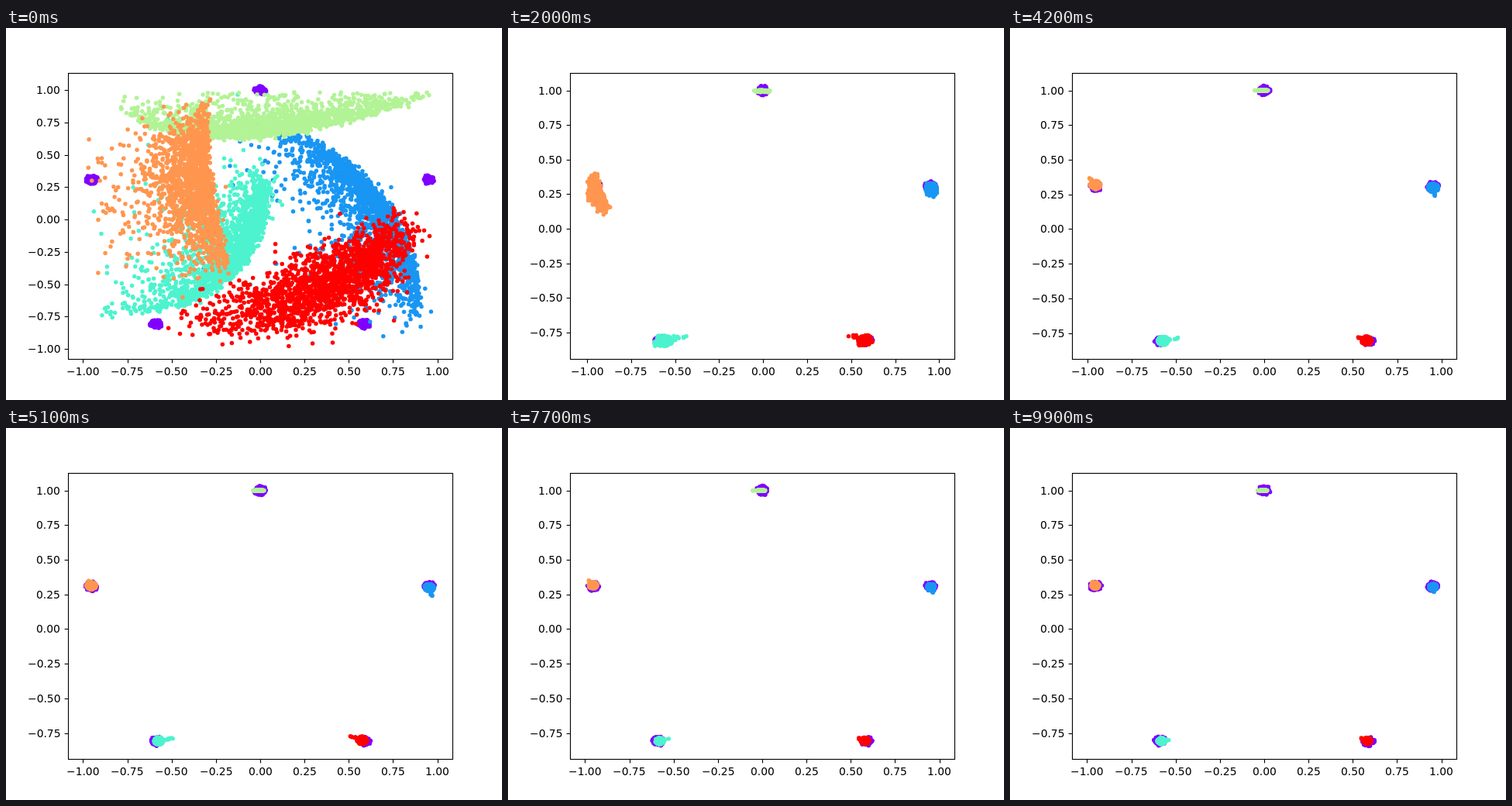
An HTML page with a canvas for the animation above (10 s loop, 640 px wide and 480 px high).

```html
<!DOCTYPE html>
<html lang="en">
<head>
<meta charset="utf-8">
<title>Scatter clusters</title>
<style>
html, body { margin: 0; width: 100%; height: 100%; overflow: hidden; background: #fff; }
canvas { display: block; }
</style>
</head>
<body>
<canvas id="plot" width="640" height="480"></canvas>
<script>
const ctx = document.getElementById('plot').getContext('2d');
const STEPS = 100, STEP_MS = 100, DOT = 2.75;
const SHAPED = 9, SETTLED = 32;            // steps at which the clouds reach each phase
const RADIUS = .035;                       // of a mode, in data units
const box = { left: 80, top: 57.6, right: 576, bottom: 427.2 };

const modes = [0, 1, 2, 3, 4].map(i => {
  const a = Math.PI * (.5 + .4 * i);
  return [Math.cos(a), Math.sin(a)];
});

// wide, tight: three control points of the dense edge, then the mean spread away from it
// fuzz: blur in both phases; tail: reach of the stray dots once settled
const clouds = [
  { color: '#1996f3', mode: modes[4], tail: [.02, -.09],
    wide: [[-.08, .8], [.845, .485], [.91, -.77], [-.07, -.1]],
    tight: [[.952, .4], [.985, .33], [.982, .02], [-.012, .01]] },
  { color: '#4df3ce', mode: modes[2], tail: [.13, .03],
    wide: [[-.93, -.76], [.07, -.735], [.025, .37], [-.06, .12]],
    tight: [[-.877, -.98], [-.44, -.97], [-.371, -.813], [-.025, .045]] },
  { color: '#b2f396', mode: modes[0], tail: [-.08, 0], flat: .1,
    wide: [[-.82, .88], [-.32, .355], [.985, .97], [0, .09]],
    tight: [[-.15, .995], [0, .985], [.14, .995], [0, -.012]] },
  { color: '#ff964f', mode: modes[1], tail: [-.04, .07],
    wide: [[-.275, .96], [-.375, .55], [-.16, -.47], [-.13, -.05]],
    tight: [[-.996, .913], [-.985, .04], [-.473, -.958], [-.07, -.1]] },
  { color: '#ff0000', mode: modes[3], tail: [-.1, .05], fuzz: [.13, .03],
    wide: [[-.54, -.82], [.48, -.69], [.82, -.02], [0, 0]],
    tight: [[.455, -.97], [.57, -.875], [.75, -.8], [0, 0]] }
];

const lerp = (a, b, t) => a + (b - a) * t;
const mix = (a, b, t) => a.map((v, i) => lerp(v, b[i], t));
const easeOut = (t, power) => 1 - Math.pow(1 - t, power);

function seeded(seed) {
  let s = seed * 7919 + 12345;
  return () => {
    s = (s + 0x6D2B79F5) | 0;
    let t = Math.imul(s ^ (s >>> 15), 1 | s);
    t = (t + Math.imul(t ^ (t >>> 7), 61 | t)) ^ t;
    return ((t ^ (t >>> 14)) >>> 0) / 4294967296;
  };
}

// A dot beside a quadratic curve, thinning out with depth
function beside([a, b, c, spread], fuzz, { u, depth, noise }) {
  const taper = .15 + .85 * Math.sqrt(Math.sin(Math.PI * u));
  const curve = mix(mix(a, b, u), mix(b, c, u), u);
  const blur = fuzz + .35 * depth * Math.hypot(...spread);
  return curve.map((v, i) => v + taper * (spread[i] * depth + blur * noise[i]));
}

function settled(cloud, step, reach, { angle, r, stray }) {
  const age = Math.max(0, step - SETTLED);
  const size = RADIUS * (.65 + .35 * Math.exp(-age / 25)) * (stray ? .15 : r);
  const pull = reach * (.5 + .5 * Math.exp(-age / 20)) * (stray || .15);
  return [cloud.mode[0] + cloud.tail[0] * pull + size * Math.cos(angle),
          cloud.mode[1] + cloud.tail[1] * pull + size * Math.sin(angle) * (cloud.flat || 1)];
}

function makeDots(step) {
  const rnd = seeded(step + 1);
  const gauss = () => Math.sqrt(-2 * Math.log(1 - rnd())) * Math.cos(2 * Math.PI * rnd());
  const dots = [];

  for (const [x, y] of modes)
    for (let i = 0; i < 400; i++) {
      const r = Math.min(RADIUS, .0112 * Math.sqrt(-2 * Math.log(1 - rnd())));
      const a = rnd() * 2 * Math.PI;
      dots.push([x + r * Math.cos(a), y + r * Math.sin(a), '#8000ff']);
    }

  const shaping = easeOut(Math.min(1, step / SHAPED), 1.5);
  const settling = easeOut(Math.min(1, Math.max(0, step - SHAPED) / (SETTLED - SHAPED)), 3);
  const count = lerp(1800, 170, settling);
  for (const cloud of clouds) {
    const [wideFuzz, tightFuzz] = cloud.fuzz || [.012, .003];
    const reach = .7 + .5 * rnd();
    for (let i = 0; i < count; i++) {
      const draw = {
        u: Math.pow((rnd() + rnd()) / 2, .8), depth: -Math.log(1 - rnd()),
        noise: [gauss(), gauss()], angle: rnd() * 2 * Math.PI, r: Math.pow(rnd(), .6),
        stray: i % 20 ? 0 : i ? rnd() : 1
      };
      const shaped = mix(beside(cloud.wide, wideFuzz, draw),
                         beside(cloud.tight, tightFuzz, draw), shaping);
      const [x, y] = mix(shaped, settled(cloud, step, reach, draw), settling);
      const limit = lerp(.985, 1, shaping);
      if (Math.abs(x) < limit && Math.abs(y) < limit + .01 * settling)
        dots.push([x, y, cloud.color]);
    }
  }
  return dots;
}

// Linear scale over the data with a 5% margin on both sides
function fit(values, low, high, from, to) {
  for (const v of values) {
    low = Math.min(low, v);
    high = Math.max(high, v);
  }
  const margin = .05 * (high - low);
  return v => lerp(from, to, (v - low + margin) / (high - low + 2 * margin));
}

function drawAxes(toX, toY) {
  const snap = v => Math.floor(v + .5) + .5;
  const line = (x0, y0, x1, y1) => {
    ctx.beginPath();
    ctx.moveTo(x0, y0);
    ctx.lineTo(x1, y1);
    ctx.stroke();
  };
  // align: share of the text width left of x
  const label = (v, x, y, align) => {
    const text = (v < 0 ? '\u2212' : '') + Math.abs(v).toFixed(2);
    ctx.fillText(text, Math.round(x - ctx.measureText(text).width * align), Math.round(y));
  };
  ctx.strokeStyle = ctx.fillStyle = '#000';
  ctx.lineWidth = 1.11;
  ctx.font = '13.89px "DejaVu Sans", sans-serif';
  ctx.strokeRect(80.5, 58.5, 496, 369);
  for (let v = -1; v <= 1; v += .25) {
    const x = toX(v), y = toY(v);
    line(snap(x), 427.5, snap(x), 432.4);
    label(v, x, 448, .5);
    if (y > box.bottom) continue;
    line(75.6, snap(y), 80.5, snap(y));
    label(v, 70.3, y + 5, 1);
  }
}

function draw(step) {
  const dots = makeDots(step);
  const side = modes[4][0] + RADIUS, floor = modes[2][1] - RADIUS;
  const toX = fit(dots.map(d => d[0]), -side, side, box.left, box.right);
  const toY = fit(dots.map(d => d[1]), floor, 1 + RADIUS, box.bottom, box.top);

  ctx.fillStyle = '#fff';
  ctx.fillRect(0, 0, 640, 480);
  for (const [x, y, color] of dots) {
    ctx.fillStyle = color;
    ctx.beginPath();
    ctx.arc(toX(x), toY(y), DOT, 0, 2 * Math.PI);
    ctx.fill();
  }
  drawAxes(toX, toY);
}

let shown = -1;
function tick() {
  const step = Math.floor(performance.now() / STEP_MS) % STEPS;
  if (step !== shown) draw(shown = step);
  requestAnimationFrame(tick);
}
tick();
</script>
</body>
</html>
```
